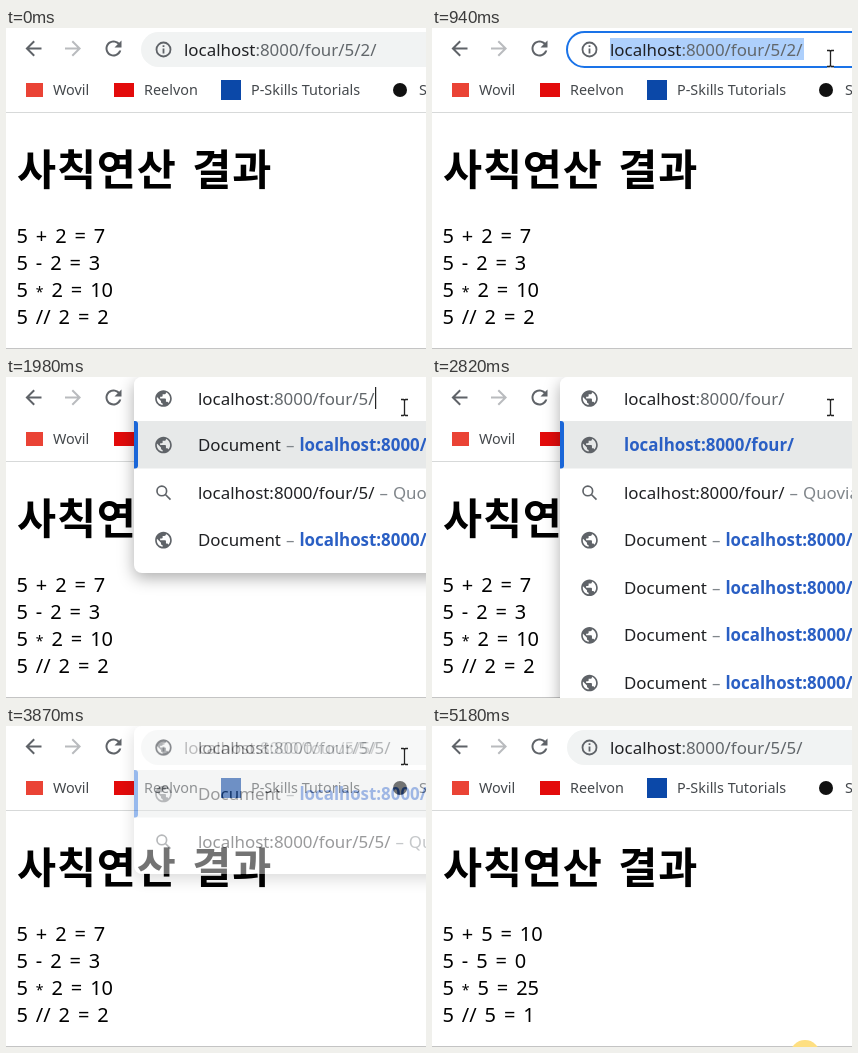
Write an HTML page that moves like this. It is 420 px wide and 321 px high and loops after 5250 ms.

```html
<!DOCTYPE html>
<html lang="ko">
<head>
<meta charset="utf-8">
<title>사칙연산 결과</title>
<style>
  html, body { margin: 0; width: 100%; height: 100%; overflow: hidden; background: #fff; }
  svg { display: block; width: 420px; height: 321px; }
  text { font-family: "Noto Sans", "Open Sans", "Noto Sans CJK KR", sans-serif; white-space: pre; }
  .url { font-size: 16.9px; fill: #202124; }
  .tail { fill: #62676b; }
  .hint { fill: #80868b; word-spacing: .6px; }
  .link { fill: #2a5fc4; font-weight: 700; }
  .mark { font-size: 14.4px; fill: #44484c; }
  .title { font: 600 42.5px "Noto Sans CJK KR", "Noto Sans CJK", sans-serif; letter-spacing: .8px; word-spacing: 3px; }
  .sum { font-size: 20px; word-spacing: 2.7px; }
  .star { font-size: 14px; }
  .icon { fill: #5f6368; }
  #card { filter: drop-shadow(0 5px 8px rgba(0, 0, 0, .32)); }
</style>
</head>
<body>
<svg viewBox="0 0 420 321">
  <defs>
    <path id="arrow" d="M20 11H7.83l5.59-5.59L12 4l-8 8 8 8 1.41-1.41L7.83 13H20v-2z"/>
    <path id="globe" d="M12 2C6.48 2 2 6.48 2 12s4.48 10 10 10 10-4.48 10-10S17.52 2 12 2zm-1 17.93c-3.95-.49-7-3.85-7-7.93 0-.62.08-1.21.21-1.79L9 15v1c0 1.1.9 2 2 2v1.93zm6.9-2.54c-.26-.81-1-1.39-1.9-1.39h-1v-3c0-.55-.45-1-1-1H8v-2h2c.55 0 1-.45 1-1V7h2c1.1 0 2-.9 2-2v-.41c2.93 1.19 5 4.06 5 7.41 0 2.08-.8 3.97-2.1 5.39z"/>
    <g id="lens" fill="none" stroke="#5f6368" stroke-width="2">
      <circle cx="10" cy="10" r="5.8"/><path d="M14.3 14.3l6.2 6.2"/>
    </g>
  </defs>

  <rect width="420" height="321" fill="#fff"/>

  <!-- toolbar -->
  <g class="icon">
    <use href="#arrow" transform="translate(15.5 8.5)"/>
    <use href="#arrow" transform="translate(79 8.5) scale(-1 1)" fill="#b9bbbe"/>
    <path transform="translate(95.5 8.5)" d="M17.65 6.35C16.2 4.9 14.21 4 12 4c-4.42 0-7.99 3.58-7.99 8s3.57 8 7.99 8c3.73 0 6.84-2.55 7.73-6h-2.08c-.82 2.33-3.04 4-5.65 4-3.31 0-6-2.69-6-6s2.69-6 6-6c1.66 0 3.14.69 4.22 1.78L13 11h7V4l-2.35 2.35z"/>
  </g>
  <rect id="pill" x="135" y="4" width="330" height="35" rx="17.5" stroke-width="2"/>
  <g fill="none" stroke="#5f6368" stroke-width="1.8">
    <circle cx="157.5" cy="21.5" r="7"/>
    <path d="M157.5 20.5v5M157.5 17.3v1.8"/>
  </g>
  <rect id="select" x="178" y="10" width="194" height="22" fill="#aed0fc"/>
  <text id="address" class="url" x="178" y="27.5"></text>

  <!-- bookmarks -->
  <rect x="20" y="55" width="17" height="14" fill="#ea4335"/>
  <text class="mark" x="47" y="67">Wovil</text>
  <rect x="108" y="55" width="20" height="14" fill="#e30b0b"/>
  <text class="mark" x="138" y="67">Reelvon</text>
  <rect x="215" y="52" width="20" height="20" fill="#0b48a8"/>
  <text class="mark" x="245" y="67">P-Skills Tutorials</text>
  <circle cx="394" cy="62" r="7" fill="#111"/>
  <text class="mark" x="413" y="67">S</text>
  <path d="M0 84.5h420" stroke="#d7d9d9"/>

  <!-- page -->
  <text class="title" x="11" y="156.5">사칙연산 결과</text>
  <g id="sums"></g>
  <path d="M0 320.5h420" stroke="#c4c4c4"/>

  <!-- suggestions -->
  <g id="popup">
    <g id="body">
      <rect id="card" x="128" y="0" width="340" rx="8" fill="#fff"/>
      <rect x="128" y="44" width="292" height="47.5" fill="#e7e9e9"/>
      <path d="M128 44h1a3 3 0 0 1 3 3v41.5a3 3 0 0 1-3 3h-1z" fill="#1a66d8"/>
      <g id="rows"></g>
    </g>
    <g id="head">
      <path d="M128 44V8a8 8 0 0 1 8-8h284v44z" fill="#fff"/>
      <use href="#globe" class="icon" transform="translate(147.5 11.5) scale(.83)"/>
      <text id="typed" class="url" x="192" y="27.5"></text>
      <rect id="caret" y="10" width="1.2" height="22" fill="#222"/>
    </g>
  </g>

  <circle id="glow" cx="373" cy="329" r="15" fill="#fedf82"/>
  <g id="pointer">
    <g id="beam" fill="none">
      <path d="M-3.5-8h2.5l1 1 1-1H3.5M0-7V7M-3.5 8h2.5l1-1 1 1H3.5" stroke="#fff" stroke-width="2.5"/>
      <path d="M-3.5-8h2.5l1 1 1-1H3.5M0-7V7M-3.5 8h2.5l1-1 1 1H3.5" stroke="#222" stroke-width="1.3"/>
    </g>
    <path id="tip" d="M0 0v16l3.7-3.5 2.5 5.8 2.6-1.1-2.5-5.7h5.2z" fill="#fff" stroke="#111"/>
  </g>
</svg>
<script>
const LOOP = 5250;
const $ = id => document.getElementById(id);
const show = (id, on) => $(id).style.display = on ? '' : 'none';
const HOST = 'localhost', BASE = ':8000/four/';

// [time, typed path, row count, opacity, caret]
const typing = [
  [0, '', 0, 0, 0],
  [1700, '5/2', 3, .6, 1], [1770, '5/2', 3, .85, 1], [1830, '5/2', 3, 1, 1],
  [1980, '5/', 3, 1, 1],
  [2260, '', 6, 1, 1], [2820, '', 6, 1, 0],
  [2890, '5', 3, 1, 1], [3100, '5/', 3, 1, 1],
  [3240, '5/5', 2, 1, 1], [3450, '5/5/', 2, 1, 1],
  [3800, '5/5/', 2, .75, 0], [3870, '5/5/', 2, .45, 0], [3940, '5/5/', 2, .18, 0],
  [4010, '', 0, 0, 0]
];

// [time, x, y]
const moves = [
  [0, 450, 4], [130, 420, 6], [210, 415, 10], [290, 411, 15], [370, 407, 20],
  [450, 404, 25], [530, 402, 28], [610, 400, 30], [680, 398.5, 30.5],
  [4490, 397.5, 40], [4560, 396, 58], [4630, 393, 95], [4700, 389, 150],
  [4760, 385, 210], [4830, 380, 270], [4900, 375, 335]
];

const at = (list, t) => list.findLast(step => step[0] <= t);
const address = path => `${HOST}<tspan class="tail">${BASE}${path}</tspan>`;

function suggestion(i, path) {
  const y = 68 + 47.6 * i;
  const full = HOST + BASE + path;
  const link = s => `<tspan class="link">${s}</tspan>`;
  const hint = s => `<tspan class="hint">${s}</tspan>`;
  const label = i === 1 ? full + hint(' – Quovia')
    : i === 0 && !path ? link(full)
    : 'Document' + hint(' – ') + link(HOST + BASE);
  return `<use href="#${i === 1 ? 'lens' : 'globe'}" class="icon"
    transform="translate(147.5 ${y - 10}) scale(.83)"/>
    <text class="url" x="192" y="${y + 6}">${label}</text>`;
}

function drawPopup([time, path, count, opacity, caret]) {
  show('popup', count);
  if (!count) return;
  $('card').setAttribute('height', 52 + 48 * count);
  $('rows').innerHTML = Array.from({ length: count }, (_, i) => suggestion(i, path)).join('');
  $('body').style.opacity = opacity;
  $('head').style.opacity = time < 3800 ? 1 : opacity;
  $('typed').innerHTML = address(path);
  $('caret').setAttribute('x', 192.5 + $('typed').getComputedTextLength());
  show('caret', caret);
}

function drawSums(n) {
  const star = '<tspan class="star">*</tspan>';
  const lines = [`+ ${n} = ${5 + n}`, `- ${n} = ${5 - n}`, `${star} ${n} = ${5 * n}`, `// ${n} = ${Math.floor(5 / n)}`];
  $('sums').innerHTML = lines
    .map((s, i) => `<text class="sum" x="10.5" y="${215 + 27 * i}">5 ${s}</text>`).join('');
}

const last = {};
function update(key, value, draw) {
  if (last[key] === value) return;
  last[key] = value;
  draw(value);
}

function frame() {
  const t = performance.now() % LOOP;
  update('popup', at(typing, t), drawPopup);
  update('sums', t < 4150 ? 2 : 5, drawSums);
  update('address', t < 3800 ? '5/2/' : '5/5/', path => $('address').innerHTML = address(path));

  const [, x, y] = at(moves, t);
  const inBar = y < 42;
  const focused = t >= 880 && t < 3800;
  const hover = inBar && x < 420;
  $('pill').setAttribute('fill', focused ? '#fff' : hover ? '#e8eaea' : '#f1f3f3');
  $('pill').setAttribute('stroke', focused ? '#1a73e8' : 'none');
  show('select', t >= 940 && t < 1700);

  $('pointer').setAttribute('transform', `translate(${x} ${y})`);
  show('beam', inBar);
  show('tip', !inBar);
  show('glow', t >= 5180);
  requestAnimationFrame(frame);
}
frame();
</script>
</body>
</html>
```
